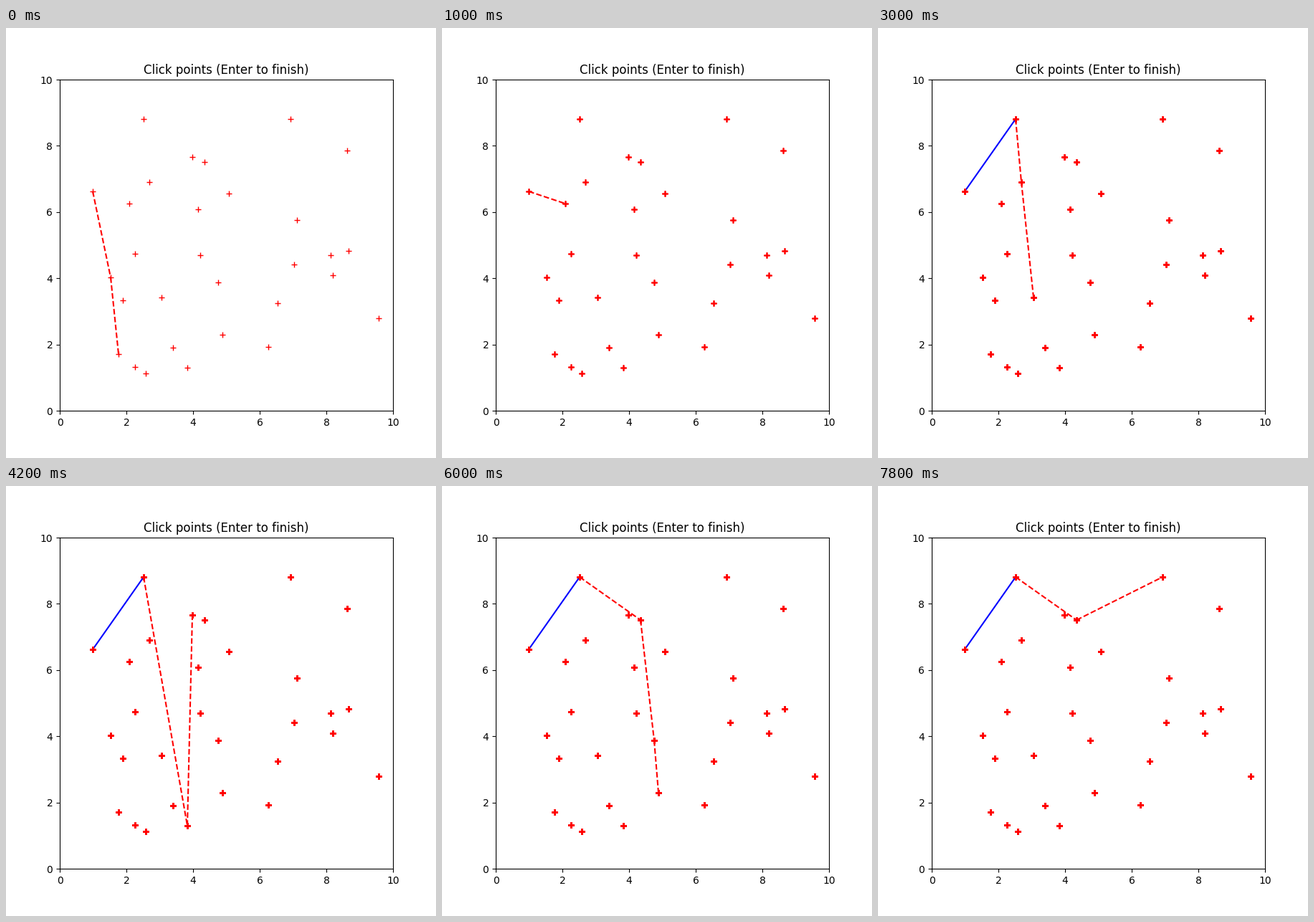
Write a matplotlib script that moves like this. It is 600 px wide and 600 px high and loops after 8000 ms.

```python
import matplotlib.pyplot as plt
from matplotlib.animation import FuncAnimation

STEP_MS = 200
STEPS = 40
LEFT, BASE = 75, 534          # axes origin in pixels
UNIT_X, UNIT_Y = 46.5, 46.2   # pixels per data unit

# Clicked pixels, ordered by x
CLICKS = [
    (121, 228), (146, 348), (157, 455), (163, 380), (172, 245), (180, 473),
    (180, 315), (192, 127), (195, 482), (200, 215), (217, 376), (233, 446),
    (253, 474), (260, 180), (268, 253), (271, 317), (277, 187), (296, 355),
    (302, 428), (311, 231), (366, 445), (379, 384), (397, 127), (402, 330),
    (406, 268), (453, 317), (456, 345), (476, 171), (478, 311), (520, 405),
]
# The small nudge keeps the marker snapping stable
POINTS = [((x + 0.02 - LEFT) / UNIT_X, (BASE - y - 0.02) / UNIT_Y)
          for x, y in CLICKS]


def turns_left(a, b, c):
    (ax_, ay), (bx, by), (cx, cy) = CLICKS[a], CLICKS[b], CLICKS[c]
    # pixel y grows downwards, so the sign is flipped
    return (bx - ax_) * (cy - ay) - (by - ay) * (cx - ax_) <= 0


def upper_hull_states():
    """Every state of the stack: one per push and one per pop."""
    stack, states = [0, 1], []
    for i in range(2, len(CLICKS)):
        stack.append(i)
        states.append(list(stack))
        while len(stack) > 2 and turns_left(*stack[-3:]):
            del stack[-2]
            states.append(list(stack))
    return states


def edges(stack):
    return list(zip(stack, stack[1:]))


states = upper_hull_states()
final_edges = set(edges(states[-1]))
states = states[:STEPS]

fig, ax = plt.subplots(figsize=(6, 6), dpi=100)
ax.set_xlim(0, 10)
ax.set_ylim(0, 10)
ax.set_title("Click points (Enter to finish)")

# Each step stamps the markers once more, which slowly thickens them
xs, ys = zip(*POINTS)
stamps = [ax.plot(xs, ys, "r+", zorder=2)[0] for _ in range(STEPS)]
segments = [ax.plot([], [], zorder=1)[0]
            for _ in range(max(map(len, states)) - 1)]


def draw(step):
    for i, stamp in enumerate(stamps):
        stamp.set_visible(i <= step)
    current = edges(states[step])
    for i, line in enumerate(segments):
        line.set_visible(i < len(current))
        if i < len(current):
            a, b = current[i]
            done = (a, b) in final_edges
            line.set_data(*zip(POINTS[a], POINTS[b]))
            line.set_color("b" if done else "r")
            line.set_linestyle("-" if done else "--")
    return stamps + segments


anim = FuncAnimation(fig, draw, frames=STEPS, init_func=lambda: draw(0),
                     interval=STEP_MS, repeat=True, repeat_delay=0)
plt.show()
```
